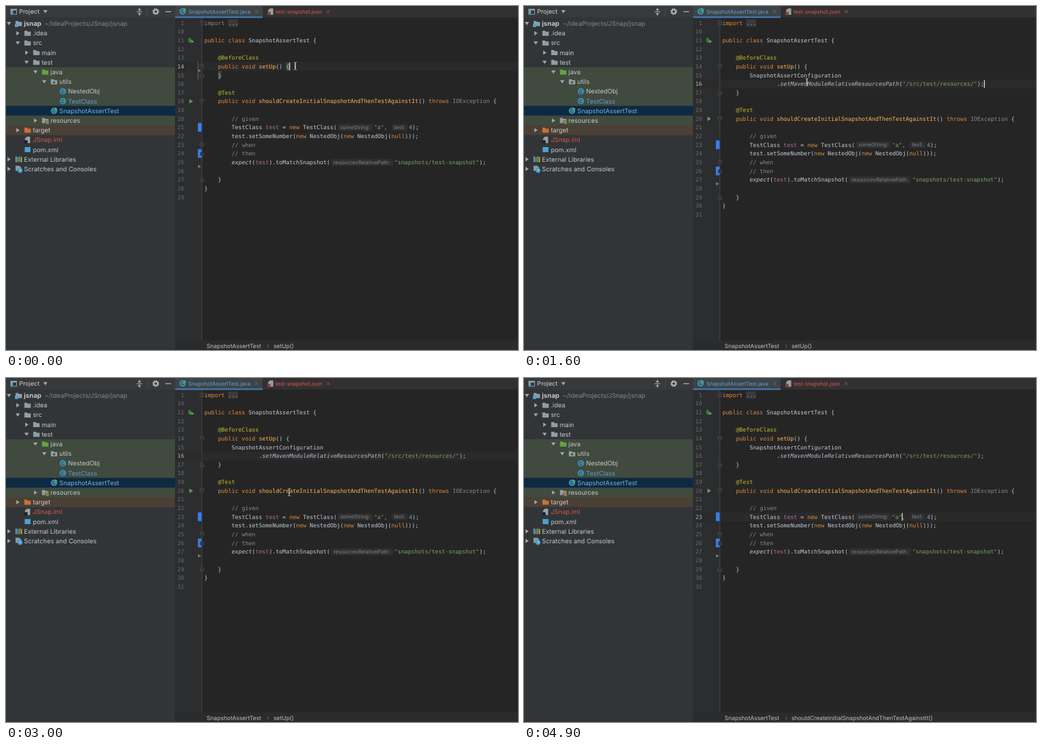
Write an HTML page that moves like this. It is 800x539 px and loops after 5000 ms.

```html
<!DOCTYPE html>
<html lang="en">
<head>
<meta charset="utf-8">
<title>Snapshot test editor</title>
<style>
  html, body { margin: 0; width: 100%; height: 100%; overflow: hidden; background: #252525; }
  svg { display: block; width: 800px; height: 539px; }
  text { white-space: pre; text-rendering: geometricPrecision; }
  .ui { font-family: Inter, "Open Sans", sans-serif; }
  .code { font-family: "DejaVu Sans Mono", "Liberation Mono", monospace; font-size: 8.82px; }
</style>
</head>
<body>
<svg id="stage" viewBox="0 0 800 539" xmlns="http://www.w3.org/2000/svg"></svg>
<script>
const stage = document.getElementById('stage');
const LOOP = 5000, STEP = 100, BLINK = 520;
const CHAR = 5.31, LEFT = 310, ROW = 13.65, TOP = 26.6;
const INK = {
  d: '#c3c9d1', k: '#e28a38', f: '#fdb850', a: '#c3bb2e', c: '#8a8a8a',
  s: '#7ba268', n: '#62a6d4', v: '#b5698f', g: '#85898d', i: '#c3c9d1', j: '#b4c0cc'
};

function el(parent, tag, attrs, text) {
  const node = document.createElementNS('http://www.w3.org/2000/svg', tag);
  for (const key in attrs) node.setAttribute(key, attrs[key]);
  if (text !== undefined) node.textContent = text;
  parent.appendChild(node);
  return node;
}
const rect = (p, x, y, width, height, fill, rx = 0) => el(p, 'rect', { x, y, width, height, fill, rx });
const path = (p, d, fill, stroke = 'none', w = 1) => el(p, 'path', { d, fill, stroke, 'stroke-width': w });
const dot = (p, cx, cy, r, fill) => el(p, 'circle', { cx, cy, r, fill });
const label = (p, x, cy, str, size, fill, weight = 400) =>
  el(p, 'text', { x, y: cy + size * 0.364, class: 'ui', 'font-size': size, fill, 'font-weight': weight }, str);
const code = (p, x, cy, str, fill, style = 'normal', anchor = 'start') =>
  el(p, 'text', { x, y: cy + 3, class: 'code', fill, 'font-style': style, 'text-anchor': anchor }, str);
const rowY = r => TOP + r * ROW;

function arrow(p, x, y, open) {
  const d = open ? `M${x - 3.4} ${y - 2.4}h6.8l-3.4 5z` : `M${x - 2.2} ${y - 3.4}v6.8l5-3.4z`;
  path(p, d, '#a3a6a8');
}

const folder = (p, x, y, fill) => path(p, `M${x - 5} ${y - 4}h4l1.4 1.6h4.6v6.4h-10z`, fill);

function classIcon(p, x, y) {
  dot(p, x, y, 5, '#3d8fb3');
  el(p, 'text', { x, y: y + 2.8, class: 'ui', 'font-size': 7.6, 'font-weight': 500,
    fill: '#23323a', 'text-anchor': 'middle' }, 'C');
}

function testIcon(p, x, y) {
  classIcon(p, x, y);
  path(p, `M${x + 1.5} ${y - 5.5}l4 2.5l-4 2.5z`, '#62b543');
}

function fileIcon(p, x, y, tint) {
  path(p, `M${x - 1} ${y - 5}h5v10h-8v-7z`, '#9aa0a4');
  rect(p, x - 5, y + 0.5, 5, 5, tint);
}

const icons = {
  root(p, x, y) { folder(p, x, y, '#929da4'); rect(p, x - 6, y + 0.5, 5, 5, '#3fa9d6'); },
  folder(p, x, y) { folder(p, x, y, '#929da4'); },
  green(p, x, y) { folder(p, x, y, '#62a53f'); },
  pack(p, x, y) { folder(p, x, y, '#929da4'); dot(p, x, y + 1, 1.6, '#3c4540'); },
  res(p, x, y) {
    folder(p, x, y, '#929da4');
    rect(p, x, y, 6, 5.5, '#404a3e');
    for (let i = 0; i < 3; i++) rect(p, x + 0.8, y + 0.6 + i * 1.8, 5, 1, '#d9a343');
  },
  orange(p, x, y) { folder(p, x, y, '#c9713a'); },
  cls: classIcon,
  test: testIcon,
  file(p, x, y) { fileIcon(p, x, y, '#1f2224'); },
  square(p, x, y) { rect(p, x - 4.5, y - 4, 9, 8, '#4aa3d0'); },
  libs(p, x, y) {
    ['#9aa0a4', '#4f9ed0', '#62b543', '#d9a343'].forEach((c, i) =>
      rect(p, x - 5 + i * 2.8, y - 4.5 + (i % 2), 1.8, 9 - (i % 2), c));
  },
  scratch(p, x, y) {
    path(p, `M${x - 5} ${y - 5}h6l3 3v5h-9z`, '#8f989e');
    dot(p, x + 2, y + 2.3, 3.8, '#3d9bd0');
    path(p, `M${x + 2} ${y}v2.5h2`, 'none', '#eef3f5', 0.9);
  }
};

// level, state (1 open, 0 closed, -1 leaf), icon, name, colour
const tree = [
  [0, 1, 'root', 'jsnap'], [1, 0, 'folder', '.idea'], [1, 1, 'folder', 'src'],
  [2, 0, 'folder', 'main'], [2, 1, 'folder', 'test'], [3, 1, 'green', 'java'],
  [4, 1, 'pack', 'utils'], [5, -1, 'cls', 'NestedObj'], [5, -1, 'cls', 'TestClass', '#629bcb'],
  [4, -1, 'test', 'SnapshotAssertTest', '#7fb0d8'], [3, 0, 'res', 'resources'],
  [1, 0, 'orange', 'target'], [1, -1, 'file', 'JSnap.iml', '#d4564a'],
  [1, -1, 'square', 'pom.xml'], [0, 0, 'libs', 'External Libraries'],
  [0, 0, 'scratch', 'Scratches and Consoles']
];

function drawTree(p) {
  rect(p, 0, 0, 264, 539, '#323537');
  rect(p, 0, 0, 264, 18, '#373a3c');
  rect(p, 0, 96, 264, 60.6, '#404a3f');
  rect(p, 0, 156.6, 264, 15.2, '#0d2a42');
  rect(p, 0, 171.8, 264, 15.2, '#404a3f');
  rect(p, 0, 187, 264, 15.2, '#4a4035');
  rect(p, 7, 4.5, 10, 9, '#9aa0a4');
  rect(p, 8, 7, 8, 5.5, '#33373a');
  rect(p, 8, 7, 3, 5.5, '#3f9fd0');
  label(p, 20.5, 9, 'Project', 9.6, '#d0d2d3');
  arrow(p, 61.5, 9, true);
  path(p, 'M204 9h9M208.5 3v4M206.5 5l2 2l2-2M208.5 15v-4M206.5 13l2-2l2 2', 'none', '#b4b7b9', 1.1);
  rect(p, 220.5, 3, 1, 12, '#4c4f51');
  el(p, 'circle', { cx: 234, cy: 8.7, r: 3, fill: 'none', stroke: '#b4b7b9', 'stroke-width': 2 });
  el(p, 'circle', { cx: 234, cy: 8.7, r: 4.5, fill: 'none', stroke: '#b4b7b9', 'stroke-width': 1.6, 'stroke-dasharray': '1.8 1.735' });
  rect(p, 249, 8.2, 9, 1.3, '#b4b7b9');
  tree.forEach(([level, state, icon, name, color = '#c6c9cb'], i) => {
    const x = 4.6 + level * 13.8, y = 27.5 + i * 15.19;
    if (state >= 0) arrow(p, x, y, state === 1);
    icons[icon](p, x + 15.3, y);
    label(p, x + 23.5, y, name, i ? 9.9 : 10.2, color, i ? 400 : 700);
  });
  label(p, 60.5, 27.5, '~/IdeaProjects/JSnap/jsnap', 9.9, '#85888a');
}

const cross = (p, x, y) => path(p, `M${x - 2.3} ${y - 2.3}l4.6 4.6m0-4.6l-4.6 4.6`, 'none', '#6f7375', 0.9);

function drawFrame(p) {
  rect(p, 264, 0, 536, 539, '#262526');
  rect(p, 264, 18, 42, 506, '#2c2d2f');
  rect(p, 264, 0, 536, 18, '#2f3133');
  rect(p, 264, 0, 137, 18, '#3d4448');
  rect(p, 401, 0, 112, 18, '#343032');
  rect(p, 264, 16.5, 137, 2.1, '#4780bb');
  testIcon(p, 276, 8.5);
  label(p, 285, 8.5, 'SnapshotAssertTest.java', 8.3, '#64a0d3');
  cross(p, 391.5, 8.7);
  fileIcon(p, 413.5, 8.7, '#7a4641');
  label(p, 421, 8.5, 'test-snapshot.json', 8.3, '#d8594d');
  cross(p, 503.5, 8.7);
  rect(p, 263.3, 0, 0.9, 539, '#2a2b2c');
  rect(p, 264, 524, 536, 15, '#2a2b2c');
  label(p, 313.5, 533, 'SnapshotAssertTest', 9, '#bfc2c4');
  path(p, 'M408.5 530.6l2 2.4l-2 2.4', 'none', '#777b7e', 0.9);
}

// A line is [column, tone, text, tone, text, ...]; tone 'h' is a parameter hint [text, width]
const head = [
  [0], [0],
  [0, 'k', 'public class ', 'd', 'SnapshotAssertTest {'], [0],
  [4, 'a', '@BeforeClass'],
  [4, 'k', 'public void ', 'f', 'setUp', 'd', '() {']
];
const tail = [
  [4, 'd', '}'], [0],
  [4, 'a', '@Test'],
  [4, 'k', 'public void ', 'f', 'shouldCreateInitialSnapshotAndThenTestAgainstIt', 'd', '() ',
    'k', 'throws ', 'g', 'IOException ', 'd', '{'],
  [0],
  [8, 'c', '// given'],
  [8, 'd', 'TestClass ', 'v', 'test', 'd', ' = ', 'k', 'new ', 'd', 'TestClass(',
    'h', ['someString:', 54.4], 's', '"a"', 'k', ', ', 'h', ['test:', 25], 'n', '4', 'd', ');'],
  [8, 'd', 'test.setSomeNumber(', 'k', 'new ', 'd', 'NestedObj(', 'k', 'new ', 'd', 'NestedObj(',
    'k', 'null', 'd', ')));'],
  [8, 'c', '// when'],
  [8, 'c', '// then'],
  [8, 'i', 'expect', 'd', '(', 'v', 'test', 'd', ').toMatchSnapshot(',
    'h', ['resourcesRelativePath:', 97], 's', '"snapshots/test-snapshot"', 'd', ');'],
  [0],
  [4, 'd', '}'], [0, 'd', '}'], [0]
];
const pasted = [
  [8, 'd', 'SnapshotAssertConfiguration'],
  [16, 'd', '.', 'j', 'setMavenModuleRelativeResourcesPath', 'd', '(', 's', '"/src/test/resources/"', 'd', ');']
];

function drawLine(p, [col, ...parts], y) {
  let x = LEFT + col * CHAR;
  for (let i = 0; i < parts.length; i += 2) {
    const tone = parts[i], part = parts[i + 1];
    if (tone === 'h') {
      const [str, w] = part;
      rect(p, x + 1.3, y - 5.6, w, 11, '#2f2f31', 3);
      label(p, x + 5.2, y - 0.3, str, 8.2, '#7d8183');
      x += w + 3.2;
    } else {
      code(p, x, y, part, INK[tone], 'ij'.includes(tone) ? 'italic' : 'normal');
      x += part.length * CHAR;
    }
  }
}

const fold = (p, y, flip) => {
  const s = flip ? -1 : 1;
  path(p, `M303.2 ${y - 3 * s}h5.6v${4 * s}l-2.8 ${2.4 * s}l-2.8 ${-2.4 * s}z`, '#292a2b', '#515456', 0.8);
  path(p, `M304.6 ${y - 0.6 * s}h2.8`, 'none', '#606365', 0.8);
};

function drawScene({ extra, row, caretX, crumb, unused, braces }) {
  const g = el(stage, 'g', { display: 'none' });
  const n = extra.length, lines = [...head, ...extra, ...tail];
  rect(g, 264, rowY(row) - 6.8, 536, ROW, '#2b2a2b');
  rect(g, 305.6, 19, 0.9, 505, '#48494b');
  lines.forEach((line, r) => {
    code(g, 278.3, rowY(r), r ? r + 9 : 1, r === row ? '#b3b4b5' : '#676a6d', 'normal', 'end');
  });
  const bar = r => rect(g, 299.8, rowY(r) - 7.1, 5.8, ROW, '#3580ec');
  const gap = r => path(g, `M300 ${rowY(r) + 3.8}v5.2l5-2.6z`, '#75797b');
  bar(12 + n);
  bar(15 + n);
  gap(16 + n);
  if (!n) gap(5);
  if (n === 1) bar(6);
  fold(g, rowY(5));
  fold(g, rowY(6 + n), true);
  fold(g, rowY(9 + n));
  fold(g, rowY(14 + n));
  fold(g, rowY(15 + n), true);
  fold(g, rowY(18 + n), true);
  rect(g, 303.2, TOP - 2.8, 5.6, 5.6, '#292a2b');
  path(g, `M303.2 ${TOP - 2.8}h5.6v5.6h-5.6zM304.6 ${TOP}h2.8M306 ${TOP - 1.4}v2.8`, 'none', '#515456', 0.8);
  path(g, `M288.4 ${rowY(2) - 3.6}a3.2 3.2 0 1 0 2.6 5.4`, 'none', '#4f9f4a', 1.3);
  path(g, `M287.6 ${rowY(2) - 2.4}v4.4l3.6-2.2zM290 ${rowY(2) - 0.6}l4 2.3l-4 2.3z`, '#57ab50');
  path(g, `M286.6 ${rowY(9 + n) - 3.4}v6.8l5.6-3.4z`, '#57ab50');
  if (braces) {
    rect(g, 299.6, rowY(5) - 6.8, 1, 2 * ROW, '#6a6d6f');
    rect(g, LEFT + 24 * CHAR - 0.3, rowY(5) - 6.5, 5.6, 13, '#334541');
    rect(g, LEFT + 4 * CHAR - 0.3, rowY(6) - 6.5, 5.6, 13, '#334541');
  }
  rect(g, 347, TOP - 5.6, 15.5, 11.5, '#38393a', 1);
  code(g, LEFT, TOP, 'import', unused ? '#85888a' : INK.k);
  code(g, LEFT + 7 * CHAR, TOP, '...', '#9a9d9f');
  lines.forEach((line, r) => drawLine(g, line, rowY(r)));
  label(g, 418, 533, crumb, 9.05, '#bfc2c4');
  const caret = rect(g, caretX - 0.2, rowY(row) - 6.2, 1.4, 12.2, '#d6d8da');
  return { g, caret };
}

drawFrame(stage);
drawTree(stage);

const done = { extra: pasted, row: 7, caretX: LEFT + 77 * CHAR, crumb: 'setUp()' };
const scenes = [
  [0, { extra: [], row: 5, caretX: LEFT + 25 * CHAR, crumb: 'setUp()', unused: true, braces: true }],
  [900, { extra: [[0]], row: 6, caretX: LEFT + 8 * CHAR, crumb: 'setUp()', unused: true }],
  [1200, done],
  [4600, { ...done, row: 14, caretX: 590.4, crumb: 'shouldCreateInitialSnapshotAndThenTestAgainstIt()' }]
].map(([start, spec]) => ({ start, ...drawScene(spec) }));

const mouse = el(stage, 'g', {});
const beam = 'M-2.3-6q2.3 0 2.3 1.7v8.6q0 1.7 2.3 1.7M2.3-6q-2.3 0-2.3 1.7v8.6q0 1.7-2.3 1.7M-1.2 1.6h2.4';
path(mouse, beam, 'none', '#151515', 2);
path(mouse, beam, 'none', '#e4e4e4', 0.9);

const track = [
  [0, 452, 94], [1200, 452, 94], [1600, 442, 119.5], [2500, 423, 143.5],
  [3500, 462, 214.5], [4300, 589, 218], [5000, 589, 218]
];

function mouseAt(t) {
  const i = track.findIndex((k, j) => j && t <= k[0]);
  const [t0, x0, y0] = track[i - 1], [t1, x1, y1] = track[i];
  const u = (t - t0) / (t1 - t0), e = u * u * (3 - 2 * u);
  return [x0 + (x1 - x0) * e, y0 + (y1 - y0) * e];
}

function draw(now) {
  const t = Math.floor((now % LOOP) / STEP) * STEP;
  const live = scenes.filter(s => s.start <= t).pop();
  for (const s of scenes) s.g.setAttribute('display', s === live ? 'inline' : 'none');
  const lit = Math.floor((t - live.start) / BLINK) % 2 === 0;
  live.caret.setAttribute('display', lit ? 'inline' : 'none');
  const typing = t >= 900 && t < 1300 || t >= 4800;
  mouse.setAttribute('display', typing ? 'none' : 'inline');
  mouse.setAttribute('transform', `translate(${mouseAt(t)})`);
}

const begin = performance.now();
function tick() {
  draw(performance.now() - begin);
  requestAnimationFrame(tick);
}
tick();
</script>
</body>
</html>
```
